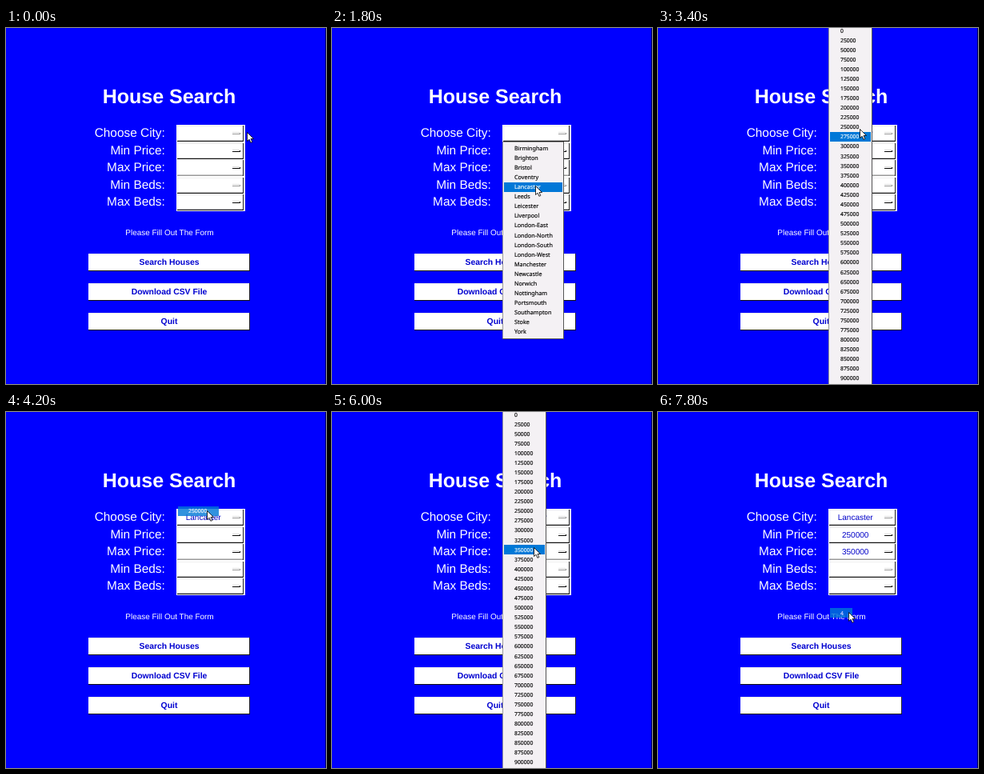
An HTML page for the animation above (8000 ms loop, 400 by 445 pixels).

```html
<!DOCTYPE html>
<html lang="en">
<head>
<meta charset="utf-8">
<title>House Search</title>
<style>
  html, body { margin: 0; width: 100%; height: 100%; overflow: hidden; background: #00f; }
  svg { display: block; width: 400px; height: 445px; }
  text { font-family: "Liberation Sans", Arial, sans-serif; text-rendering: geometricPrecision; fill: #fff; }
  .title { font-size: 25px; font-weight: bold; text-anchor: middle; }
  .label { font-size: 15.4px; text-anchor: end; }
  .status { font-size: 9.95px; text-anchor: middle; }
  .button { font-size: 10.4px; font-weight: bold; text-anchor: middle; fill: #0000d0; }
  .value { font-size: 10px; text-anchor: middle; fill: #0000c8; }
  .item { font-family: "Noto Sans", "Open Sans", sans-serif; font-size: 7.2px; fill: #000; stroke: #000; stroke-width: 0.15px; }
  .digits { font-size: 6.8px; }
  .item.on { fill: #fff; stroke: #fff; }
</style>
</head>
<body>
<svg id="stage" viewBox="0 0 400 445"></svg>
<script>
const LOOP = 8000, STEP = 200, PITCH = 12.08;
const stage = document.getElementById('stage');

function add(parent, tag, attrs, text) {
  const el = document.createElementNS('http://www.w3.org/2000/svg', tag);
  for (const k in attrs) el.setAttribute(k, attrs[k]);
  if (text !== undefined) el.textContent = text;
  parent.append(el);
  return el;
}
const rect = (p, x, y, width, height, fill) => add(p, 'rect', { x, y, width, height, fill });
const label = (p, cls, x, y, text) => add(p, 'text', { class: cls, x, y }, text);
const show = (el, on) => { el.style.display = on ? '' : 'none'; };

rect(stage, 0, 0, 400, 445, '#00f');
rect(stage, 399, 0, 1, 445, '#000060');
label(stage, 'title', 204, 94, 'House Search');
label(stage, 'status', 204.5, 259, 'Please Fill Out The Form');

// Option rows
rect(stage, 213, 121, 86, 108, '#fff');
const rows = ['Choose City:', 'Min Price:', 'Max Price:', 'Min Beds:', 'Max Beds:'].map((name, i) => {
  const y = Math.round(122 + 21.6 * i);
  const ink = i === 0 || i === 3 ? '#999' : '#000';
  label(stage, 'label', 198.8, y + 14.3, name);
  const face = rect(stage, 214, y, 82, 19, '#fff');
  rect(stage, 214, y, 82, 1, '#eee');
  rect(stage, 214, y, 1, 19, '#eee');
  rect(stage, 214, y + 18, 82, 1, '#ccc');
  rect(stage, 214, y + 19, 83, 1, i === 2 ? '#999' : '#111');
  rect(stage, 296, y, 1, 20, '#222');
  rect(stage, 283, y + 8, 9, 1, '#ddd');
  rect(stage, 283, y + 10, 10, 1, ink);
  rect(stage, 292, y + 9, 1, 2, ink);
  return { face, value: label(stage, 'value', 246.7, y + 13.3, '') };
});

// Push buttons
['Search Houses', 'Download CSV File', 'Quit'].forEach((name, i) => {
  const y = 282 + 37 * i;
  rect(stage, 103, y, 202, 21, '#fff');
  rect(stage, 103, y, 202, 1, '#eee');
  rect(stage, 103, y + 21, 202, 1, '#111');
  rect(stage, 304, y, 1, 21, '#222');
  label(stage, 'button', 204, y + 14, name);
});

function makeMenu(names, width, first, cls) {
  const box = add(stage, 'g', {});
  const back = add(box, 'g', {});
  const top = Math.round(first - 8.5), height = Math.round(names.length * PITCH + 5);
  rect(back, 213, top, width, height, '#555');
  rect(back, 213, top, width - 1, height - 1, '#999');
  rect(back, 214, top + 1, width - 2, height - 2, '#f4f1f4');
  const bar = rect(box, 215, 0, width - 4, 12, '#0078d7');
  const items = names.map((name, i) =>
    label(box, 'item ' + cls, 228, first + i * PITCH + 2.3, name));
  function set(pick, fading) {
    show(back, !fading);
    show(bar, pick >= 0);
    bar.setAttribute('y', Math.round(first + pick * PITCH - 6.2));
    items.forEach((item, i) => {
      item.classList.toggle('on', i === pick);
      show(item, !fading || i === pick);
    });
    box.style.opacity = fading ? 0.8 : 1;
  }
  return { box, set };
}

const cities = ('Birmingham Brighton Bristol Coventry Lancaster Leeds Leicester Liverpool ' +
  'London-East London-North London-South London-West Manchester Newcastle Norwich ' +
  'Nottingham Portsmouth Southampton Stoke York').split(' ');
const prices = Array.from({ length: 41 }, (_, i) => i * 25000);
const beds = Array.from({ length: 9 }, (_, i) => i + 1);
const menus = {
  city: makeMenu(cities, 77, 150.5, ''),
  price: makeMenu(prices, 55, 3.2, 'digits'),
  beds: makeMenu(beds, 32, 215, 'digits')
};

const cursor = add(stage, 'path', {
  d: 'M.5-.5V10.5L3.1 8.2L4.9 12.3L6.8 11.5L5 7.5H8.5Z',
  fill: '#fff', stroke: '#000', 'stroke-width': 0.8
});

// time, x, y, hovered row, menu, picked item, fading
const steps = [
  [0, 301, 131, -1],
  [200, 288, 133, 0],
  [600, 286, 133, -1, 'city', -1],
  [800, 276, 147, -1, 'city', 0],
  [1000, 268, 160, -1, 'city', 1],
  [1200, 262, 173, -1, 'city', 2],
  [1400, 258, 186, -1, 'city', 3],
  [1600, 256, 195, -1, 'city', 4],
  [1800, 254, 198, -1, 'city', 4],
  [2000, 254, 199, -1, 'city', 4],
  [2200, 254, 198, -1, 'city', 4, true],
  [2400, 259, 181, 2],
  [2600, 266, 161, 1],
  [2800, 266, 159, -1, 'price', 13],
  [3000, 262, 155, -1, 'price', 13],
  [3200, 257, 144, -1, 'price', 12],
  [3400, 252, 127, -1, 'price', 11],
  [3600, 251, 124, -1, 'price', 10],
  [3800, 251, 123, -1, 'price', 10],
  [4200, 251, 124, -1, 'price', 10, true],
  [4400, 252, 134, 0],
  [4600, 255, 150, 1],
  [4800, 258, 160, 1],
  [5000, 259, 167, 2],
  [5200, 259, 168, -1, 'price', 14],
  [5400, 258, 174, -1, 'price', 14],
  [5600, 256, 179, -1, 'price', 15],
  [5800, 253, 174, -1, 'price', 14],
  [6000, 252, 170, -1, 'price', 14],
  [6200, 252, 171, -1, 'price', 14, true],
  [6400, 254, 176, 2],
  [6600, 259, 189, 3],
  [6800, 262, 197, 3],
  [7000, 261, 199, -1, 'beds', -1],
  [7200, 255, 214, -1, 'beds', 0],
  [7400, 246, 236, -1, 'beds', 2],
  [7600, 239, 250, -1, 'beds', 3],
  [7800, 238, 251, -1, 'beds', 3, true]
];
const choices = [[2400, 'Lancaster'], [4400, '250000'], [6400, '350000']];

function draw(t) {
  const [, x, y, hover, open, pick, fading] = steps.findLast(s => s[0] <= t);
  cursor.setAttribute('transform', `translate(${x} ${y})`);
  rows.forEach((row, i) => {
    row.face.setAttribute('fill', i === hover ? '#f2eff2' : '#fff');
    const choice = choices[i];
    row.value.textContent = choice && t >= choice[0] ? choice[1] : '';
  });
  for (const name in menus) {
    show(menus[name].box, name === open);
    if (name === open) menus[name].set(pick, !!fading);
  }
}

let last = -1;
function tick() {
  const t = Math.floor(performance.now() % LOOP / STEP) * STEP;
  if (t !== last) draw(last = t);
  requestAnimationFrame(tick);
}
tick();
</script>
</body>
</html>
```
